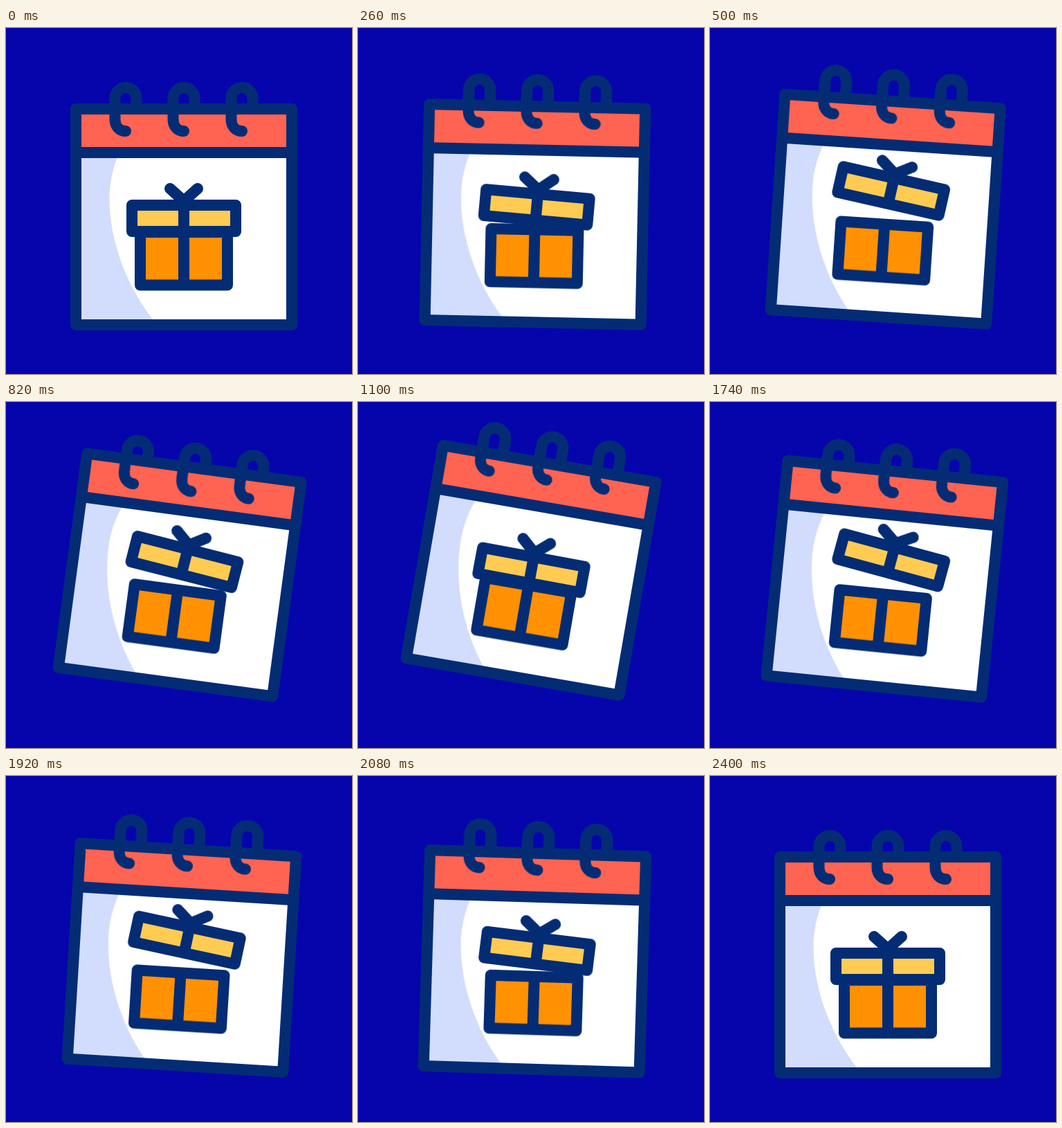
An HTML page that plays this animation: 500 px wide and 500 px high, repeating every 2420 ms.

```html
<!DOCTYPE html>
<html lang="en">
<head>
<meta charset="utf-8">
<title>Gift calendar</title>
<style>
  html, body { margin: 0; height: 100%; overflow: hidden; background: #0605ac; }
  svg { display: block; width: 100vw; height: 100vh; }

  .line { fill: none; stroke: #042c74; stroke-width: 16; stroke-linejoin: round; }
  .round { stroke-linecap: round; }

  /* this curve is a plain smoothstep */
  .calendar, .ring, .lid, .arm {
    animation: 2420ms cubic-bezier(.3333, 0, .6667, 1) infinite;
  }
  .calendar { transform-origin: 427.6px 218px; animation-name: tilt; }
  .lid { transform-origin: 442px 300px; animation-name: open; }
  .arm { transform-origin: 257px 250px; animation-name: spread; }
  .left { --turn: -8deg; }
  .right { --turn: 8deg; }
  .ring1 { animation-name: bob1; }
  .ring2 { animation-name: bob2; }
  .ring3 { animation-name: bob3; }

  @keyframes tilt {
    0%, 99.174%, 100% { transform: rotate(0deg); }
    49.587% { transform: rotate(10deg); }
  }
  @keyframes open {
    0%, 49.587%, 99.174%, 100% { transform: rotate(0deg); }
    24.793%, 74.38% { transform: rotate(9.7deg); }
  }
  @keyframes spread {
    0%, 49.587%, 99.174%, 100% { transform: rotate(0deg); }
    24.793%, 74.38% { transform: rotate(var(--turn)); }
  }
  /* the rings share one bounce, each a little ahead of the one to its left */
  @keyframes bob1 {
    0%, 99.174%, 100% { transform: translateY(0px); }
    16.942%, 50.826% { transform: translateY(-10px); }
    33.884%, 67.769% { transform: translateY(2.5px); }
    83.884% { transform: translateY(-9.5px); }
  }
  @keyframes bob2 {
    0%, 97.521%, 100% { transform: translateY(0px); }
    15.909%, 49.174% { transform: translateY(-10px); }
    32.645%, 65.909% { transform: translateY(2.5px); }
    82.025% { transform: translateY(-9.3px); }
  }
  @keyframes bob3 {
    0%, 95.868%, 100% { transform: translateY(0px); }
    14.876%, 47.521% { transform: translateY(-10px); }
    31.198%, 64.05% { transform: translateY(2.5px); }
    80.165% { transform: translateY(-9.3px); }
  }
</style>
</head>
<body>
<svg viewBox="0 0 500 500">
  <defs>
    <g id="ring" class="line">
      <path d="M15.5 121V101.5A15.5 15.5 0 0 0 -15.5 101.5V120"/>
      <path class="round" d="M-15.5 110V132C-15.5 142 -9 149 0 149"/>
    </g>
  </defs>

  <g class="calendar">
    <path fill="#fff" d="M101 180H413V429H101Z"/>
    <path fill="#d2dcfd" d="M101 180H164C154 201 149.500 225 149.500 247C149.500 310 176 375 212 421L218 429H101Z"/>
    <path fill="#ff6351" d="M101 117H413V180H101Z"/>
    <path class="line" d="M101 117H413V429H101ZM101 180H413"/>

    <g transform="translate(173)"><use href="#ring" class="ring ring1"/></g>
    <g transform="translate(257)"><use href="#ring" class="ring ring2"/></g>
    <g transform="translate(341)"><use href="#ring" class="ring ring3"/></g>

    <path class="line" style="fill:#ff9102" d="M194 295H320V371.500H194ZM257 295V371"/>

    <g class="lid">
      <path class="line" style="fill:#ffcb52" d="M182 256H332V294H182ZM257 256V294"/>
      <path class="line round arm left" d="M257 250L237 232"/>
      <path class="line round arm right" d="M257 250L277 232"/>
    </g>
  </g>
</svg>
</body>
</html>
```
